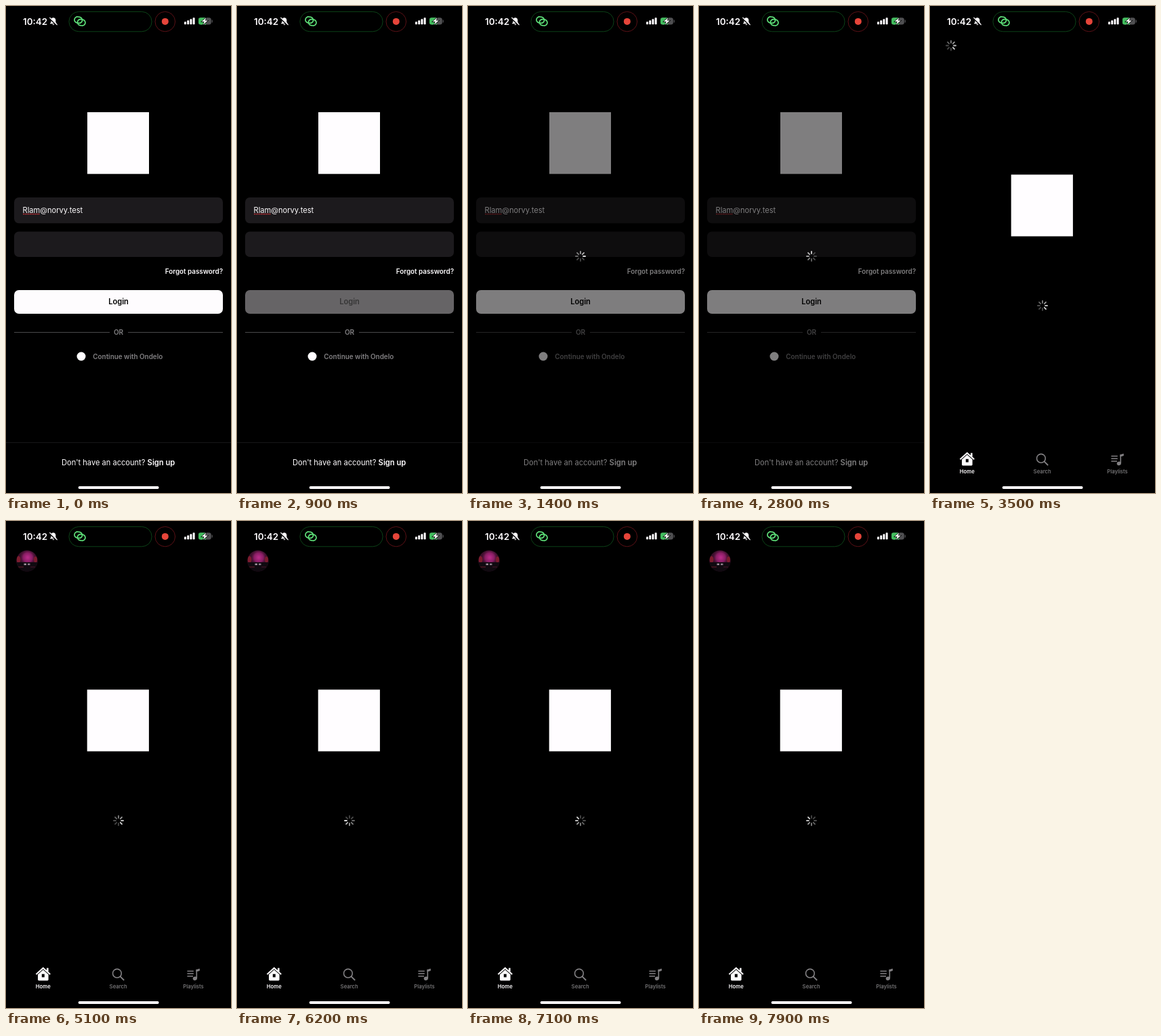
An HTML page with a canvas that plays this animation: 332x720 px, repeating every 8 s.

```html
<!DOCTYPE html>
<html lang="en">
<head>
<meta charset="utf-8">
<title>Sign in</title>
<style>
html, body { margin: 0; width: 100%; height: 100%; overflow: hidden; background: #000; }
canvas { display: block; width: 332px; height: 720px; }
</style>
</head>
<body>
<canvas id="stage"></canvas>
<script>
const W = 332, H = 720, LOOP = 8000;
const TIMES = { press: 700, release: 950, dim: 1050, home: 3100, avatar: 3950 };
const WHITE = '#fffdff', GRAY = '#828083';
const canvas = document.getElementById('stage');
const ctx = canvas.getContext('2d');
const dpr = window.devicePixelRatio || 1;
canvas.width = W * dpr;
canvas.height = H * dpr;

const ramp = (t, start, length) => Math.min(1, Math.max(0, (t - start) / length));
const ease = x => x * x * (3 - 2 * x);

function rect(x, y, w, h, color) {
  ctx.fillStyle = color;
  ctx.fillRect(x, y, w, h);
}

function box(x, y, w, h, r, color) {
  ctx.beginPath();
  ctx.roundRect(x, y, w, h, r);
  ctx.fillStyle = color;
  ctx.fill();
}

function outline(x, y, w, h, r, color, width = 1) {
  ctx.beginPath();
  ctx.roundRect(x, y, w, h, r);
  ctx.strokeStyle = color;
  ctx.lineWidth = width;
  ctx.stroke();
}

function oval(x, y, rx, ry, color, turn = 0) {
  ctx.beginPath();
  ctx.ellipse(x, y, rx, ry, turn, 0, Math.PI * 2);
  ctx.fillStyle = color;
  ctx.fill();
}

const disc = (x, y, r, color) => oval(x, y, r, r, color);

function fillPath(d, color) {
  ctx.fillStyle = color;
  ctx.fill(new Path2D(d), 'evenodd');
}

function strokePath(d, color, width) {
  ctx.strokeStyle = color;
  ctx.lineWidth = width;
  ctx.stroke(new Path2D(d));
}

function text(str, x, y, size, weight, color, align = 'left') {
  ctx.font = `${weight} ${size}px Inter, Roboto, sans-serif`;
  ctx.textAlign = align;
  ctx.fillStyle = color;
  ctx.fillText(str, x, y);
}

// Eight spokes; the brightest one steps clockwise every 100 ms.
function spinner(x, y, t, offset) {
  const lead = Math.floor(t / 100 + 0.01) + offset;
  ctx.save();
  ctx.translate(x, y);
  ctx.lineCap = 'round';
  ctx.lineWidth = 1.8;
  for (let i = 0; i < 8; i++) {
    const age = ((lead - i) % 8 + 8) % 8;
    const a = i * Math.PI / 4, c = Math.cos(a), s = Math.sin(a);
    const light = Math.round(Math.max(72, 215 - age * 28));
    ctx.strokeStyle = `rgb(${light},${light},${light})`;
    ctx.beginPath();
    ctx.moveTo(c * 4, s * 4);
    ctx.lineTo(c * 7.1, s * 7.1);
    ctx.stroke();
  }
  ctx.restore();
}

function statusBar() {
  text('10:42', 25, 27.6, 13.4, 600, WHITE);

  fillPath('M64.8 26.2 L66.4 24 V21 C66.4 18.6 67.9 17.4 69.8 17.3 C71.8 17.4 73.3 18.6 73.3 21 V24 L74.9 26.2 Z', WHITE);
  fillPath('M68.3 27.1 H71.5 Q69.9 29.4 68.3 27.1 Z', WHITE);
  strokePath('M64 18 L74.8 28.6', '#000', 2);
  strokePath('M64.4 17 L75.6 28', WHITE, 1.1);

  outline(92.9, 8.4, 122.2, 29.4, 14.7, '#0c4217');
  ctx.save();
  ctx.translate(109, 22.5);
  ctx.rotate(0.15);
  outline(-8.3, -6, 11.6, 9, 4.5, '#5fe27a', 1.7);
  outline(-3.3, -3, 11.6, 9, 4.5, '#5fe27a', 1.7);
  ctx.restore();

  outline(220, 8.4, 29.6, 29.4, 14.7, '#5b1116');
  disc(234.8, 22.9, 5, '#e6453a');

  for (let i = 0; i < 4; i++) {
    const h = 4 + i * 2;
    box(263 + i * 4.2, 27.2 - h, 3, h, 0.8, WHITE);
  }

  box(284, 17.2, 18.8, 10.4, 3.3, '#505052');
  ctx.save();
  ctx.beginPath();
  ctx.roundRect(284, 17.2, 18.8, 10.4, 3.3);
  ctx.clip();
  rect(284, 17, 11, 11, '#42bd5e');
  ctx.restore();
  box(303.6, 20.5, 1.3, 4, 0.6, '#505052');
  const bolt = 'M295.1 17.3 L288.8 23 H292.5 L290.9 27.8 L297.7 21.6 H293.9 Z';
  strokePath(bolt, '#000', 1.3);
  fillPath(bolt, WHITE);
}

function loginScreen(t) {
  rect(120, 157, 91, 91.3, WHITE);

  box(12, 283, 308, 38.3, 7, '#1c1a1d');
  box(12, 333.5, 308, 37.5, 7, '#1c1a1d');
  text('Rlam@norvy.test', 24.5, 306.3, 11.1, 400, WHITE);
  for (let x = 26; x < 50; x += 2.5) disc(x, 307.6, 0.85, '#e2363e');

  text('Forgot password?', 320, 396.2, 9.85, 600, WHITE, 'right');

  const held = ramp(t, TIMES.press, 150) - ramp(t, TIMES.release, 250);
  const shade = Math.round(254 - 152 * held), ink = Math.round(54 * held);
  box(12, 420, 308, 35, 7, `rgb(${shade},${shade - 2},${shade})`);
  text('Login', 166, 441.3, 11.1, 600, `rgb(${ink},${ink},${ink})`, 'center');

  rect(12, 482, 141, 1, '#4a494b');
  rect(180, 482, 140, 1, '#4a494b');
  text('OR', 166, 486.3, 10, 600, GRAY, 'center');

  disc(111, 518, 6.5, WHITE);
  text('Continue with Ondelo', 128.3, 521.6, 9.9, 600, GRAY);

  rect(0, 645, W, 1, '#171618');
  text("Don't have an account?", 82, 678.6, 11.1, 400, WHITE);
  text('Sign up', 208.6, 678.6, 11.2, 600, WHITE);
}

// A dim concert hall: magenta light, red edges, dark floor.
function avatar() {
  ctx.save();
  ctx.beginPath();
  ctx.arc(31, 59, 15.6, 0, Math.PI * 2);
  ctx.clip();
  rect(15, 43, 32, 32, '#3a0f2a');
  const glow = ctx.createRadialGradient(32, 54, 1, 32, 54, 13);
  glow.addColorStop(0, '#b52a86');
  glow.addColorStop(0.5, '#861d62');
  glow.addColorStop(1, 'rgba(58,15,42,0)');
  rect(15, 43, 32, 18, glow);
  oval(18.5, 57, 3, 5, '#7c1c2e');
  oval(43.5, 57, 2.5, 4.5, '#7c1c2e');
  rect(15, 61, 32, 14, '#100a10');
  rect(26.5, 62.8, 3.5, 2.4, '#a08f9c');
  rect(32, 62.8, 3.5, 2.4, '#8c7d8c');
  rect(18, 67, 8, 2, '#3c121c');
  rect(36, 67, 7, 2, '#2b0f1c');
  ctx.restore();
}

function tabs() {
  strokePath('M44.4 670.2 L54.8 660.9 L65.2 670.2', WHITE, 2);
  rect(60, 660.8, 2.6, 5.5, WHITE);
  fillPath('M47 670.6 L54.8 663.6 L62.6 670.6 V678 Q62.6 679.4 61.2 679.4 H48.4 Q47 679.4 47 678 Z M52.8 669.8 H56.8 V674.4 H52.8 Z', WHITE);
  text('Home', 54.8, 690.6, 7.7, 600, WHITE, 'center');

  ctx.beginPath();
  ctx.arc(163.9, 668.8, 6.4, 0, Math.PI * 2);
  ctx.strokeStyle = GRAY;
  ctx.lineWidth = 1.6;
  ctx.stroke();
  strokePath('M168.5 673.4 L174.2 679', GRAY, 1.8);
  text('Search', 165.7, 690.6, 7.8, 500, GRAY, 'center');

  strokePath('M267.4 665.4 H276.8 M267.4 669.2 H276.8 M267.4 673 H276', GRAY, 1.5);
  strokePath('M281.3 676.2 V663', GRAY, 1.6);
  fillPath('M280.5 663.2 L285.8 661.8 V665 L280.5 666.4 Z', GRAY);
  oval(278.8, 676.4, 3.1, 2.7, GRAY, -0.3);
  text('Playlists', 276.5, 690.6, 7.75, 500, GRAY, 'center');
}

function homeScreen(t) {
  rect(119.7, 249.3, 91.2, 91.2, WHITE);
  spinner(166, 443, t, 6);
  if (t < TIMES.avatar) spinner(31, 58.5, t, 6);
  else avatar();
  tabs();
}

function draw(t) {
  ctx.setTransform(dpr, 0, 0, dpr, 0, 0);
  rect(0, 0, W, H, '#000');
  if (t < TIMES.home) {
    loginScreen(t);
    const dim = ease(ramp(t, TIMES.dim, 300));
    if (dim > 0) {
      rect(0, 0, W, H, `rgba(0,0,0,${0.5 * dim})`);
      ctx.globalAlpha = dim;
      spinner(166, 370, t, 2);
      ctx.globalAlpha = 1;
    }
  } else {
    homeScreen(t);
  }
  statusBar();
  box(106.6, 710, 119, 4, 2, WHITE);
}

const begin = performance.now();
function tick() {
  draw((performance.now() - begin) % LOOP);
  requestAnimationFrame(tick);
}
tick();
</script>
</body>
</html>
```
